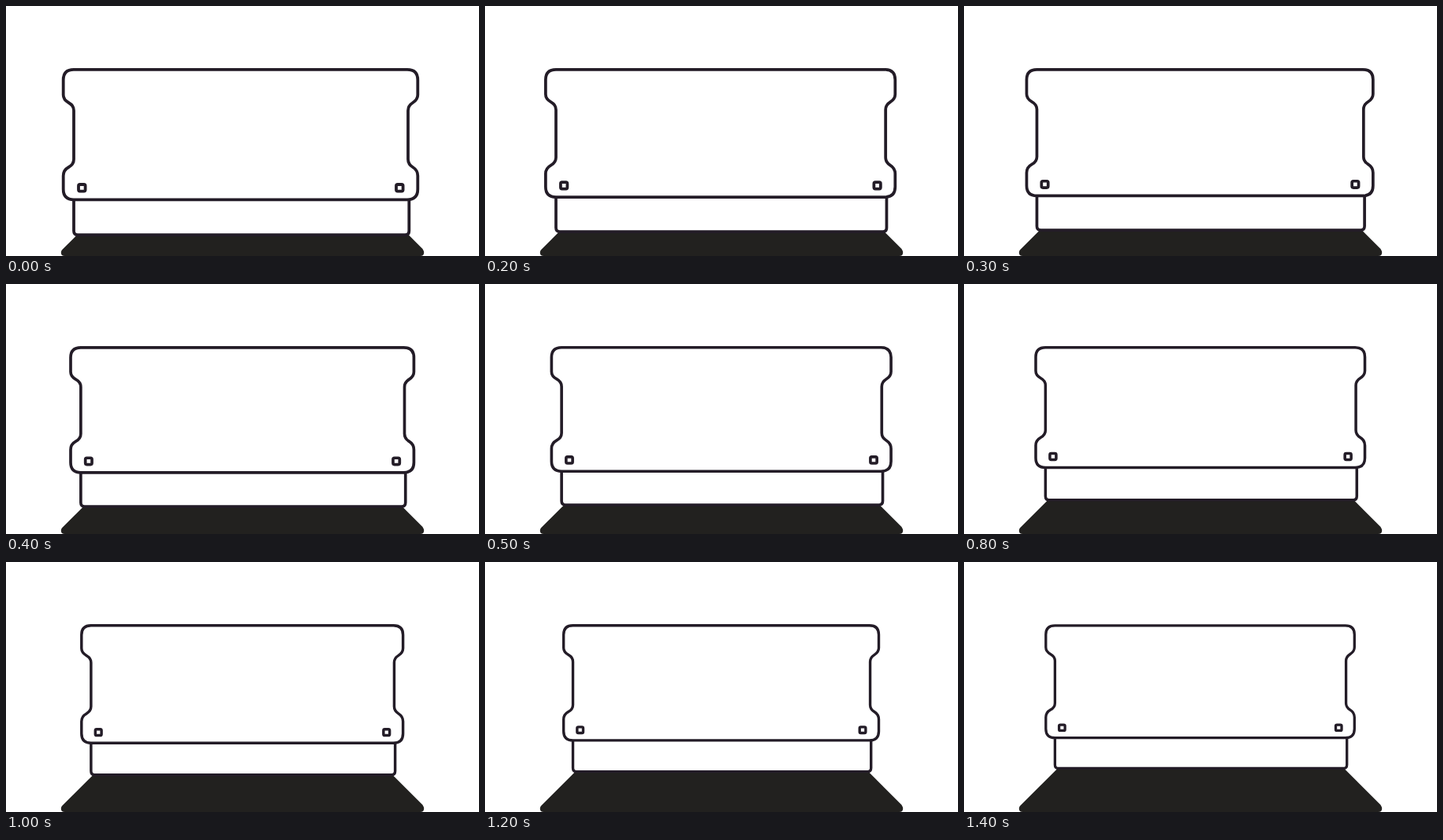
Write an HTML page that moves like this. It is 600 by 318 pixels and loops after 1600 ms.

```html
<!DOCTYPE html>
<html lang="en">
<head>
<meta charset="utf-8">
<title>Sign on a stand</title>
<style>
  html, body { margin: 0; width: 100%; height: 100%; overflow: hidden; background: #fff; }
  svg { display: block; width: 100vw; height: 100vh; }
  .line { fill: #fff; stroke: #231c27; stroke-width: 3.8; stroke-linejoin: round; }
</style>
</head>
<body>
<svg viewBox="0 0 600 318">
  <path id="floor" fill="#22211f"/>
  <g id="sign">
    <path class="line" d="M86 240V286Q86 291.2 91 291.2H506.3Q511.3 291.2 511.3 286V240Z"/>
    <path class="line" d="M86 80.8H509Q522.3 80.8 522.3 94V113C522.3 118 520 120.5 516 123
      C512 125.5 510 129 510 133V195C510 199 512 202.5 516 205C520 207.5 522.3 211 522.3 216
      V233Q522.3 246.3 509 246.3H86Q72.7 246.3 72.7 233V216C72.7 211 75 207.5 79.5 205
      C84 202.5 86 199 86 195V133C86 129 84 125.5 79.5 123C75 120.5 72.7 118 72.7 113
      V94Q72.7 80.8 86 80.8Z"/>
    <rect class="line" x="92" y="227" width="8.6" height="8.6" rx="1.8"/>
    <rect class="line" x="495" y="227" width="8.6" height="8.6" rx="1.8"/>
  </g>
</svg>
<script>
const LOOP = 1600, STEP = 100, LAST = 14;
const TOP = 80.8, LEFT = 72.7, RIGHT = 522.3, FOOT = 291.2;
// Side edges of the sign, one key per two steps
const leftKeys = [72.7, 76.9, 82, 86.8, 91, 95.8, 99.7, 103.8];
const rightKeys = [522.3, 520.3, 517.4, 512.7, 508.5, 503.6, 499.5, 495.3];
const sign = document.getElementById('sign');
const ground = document.getElementById('floor');

function at(keys, pos) {
  const i = Math.min(Math.floor(pos), keys.length - 2);
  return keys[i] + (keys[i + 1] - keys[i]) * (pos - i);
}

function draw(step) {
  const left = at(leftKeys, step / 2), right = at(rightKeys, step / 2);
  const sx = (right - left) / (RIGHT - LEFT);
  const sy = 1 - 0.1365 * step / LAST;
  sign.setAttribute('transform',
    `matrix(${sx} 0 0 ${sy} ${left - sx * LEFT} ${TOP * (1 - sy)})`);

  const y = TOP + (FOOT - TOP) * sy;
  ground.setAttribute('d', `M${381.3 - y} ${y}L71.5 309.8Q69.8 311.5 69.8 313.8
    Q69.8 318 74.5 318H525.5Q530.2 318 530.2 313.8Q530.2 311.5 528.5 308.9L${219.6 + y} ${y}Z`);
}

const start = performance.now();
function tick() {
  const t = (performance.now() - start) % LOOP;
  draw(Math.min(LAST, Math.floor(t / STEP)));
  requestAnimationFrame(tick);
}
tick();
</script>
</body>
</html>
```
